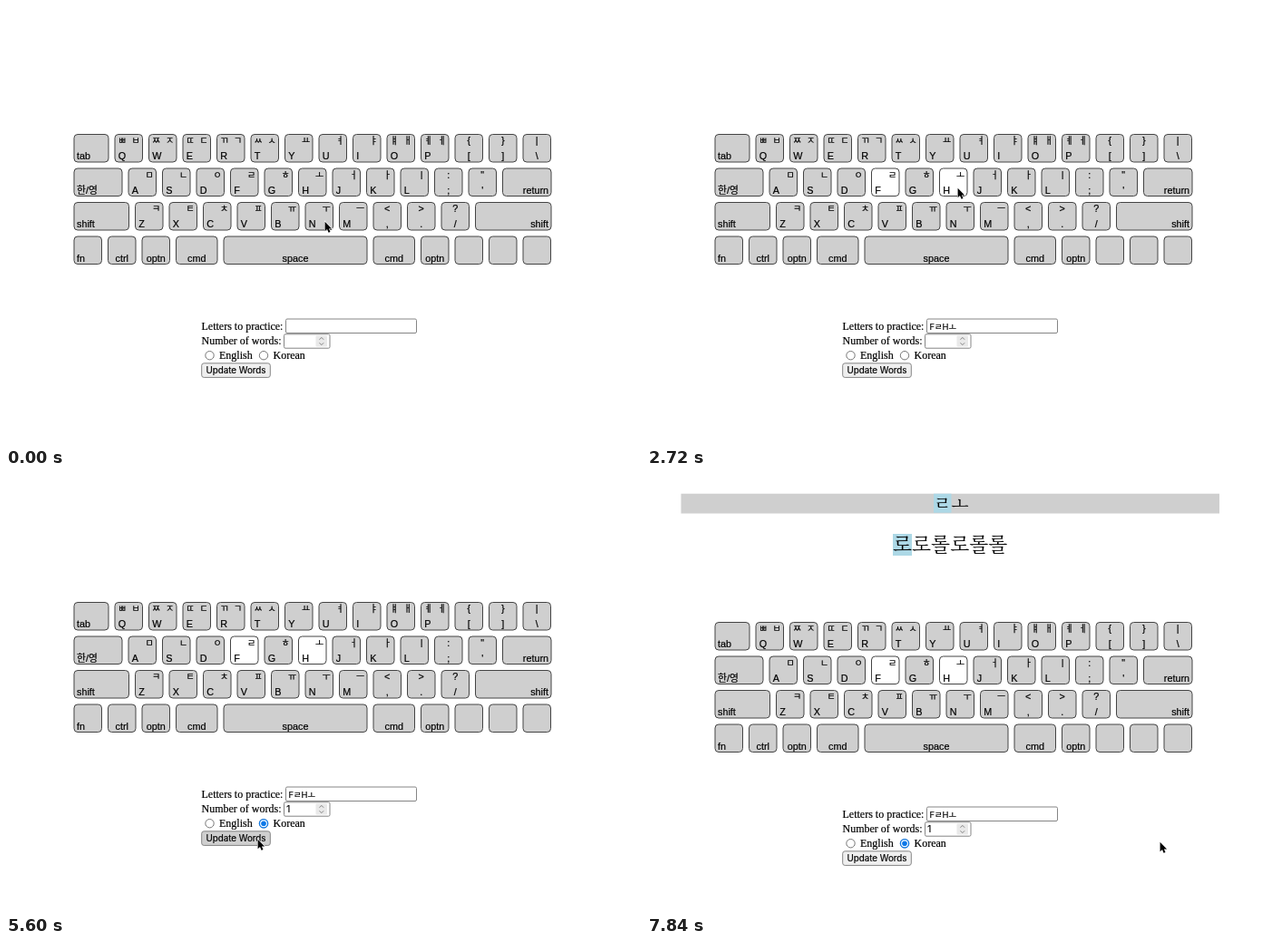
Recreate the animation shown at these times as an HTML page. Size 700 by 485 pixels, loop 8 s.

```html
<!DOCTYPE html>
<html lang="ko">
<head>
<meta charset="utf-8">
<title>Typing practice</title>
<style>
html, body { margin: 0; width: 100%; height: 100%; overflow: hidden; background: #fff; }
svg { display: block; }
#page text { stroke: #000; stroke-width: .2px; }
.label { font: 12px "Liberation Serif", Times, serif; }
.ui { font: 9.8px Inter, "Noto Sans CJK KR", sans-serif; }
.typed1, .typed2 { font-size: 9.3px; }
.key rect { fill: #cfcfcf; stroke: #444; }
.key text { font: 10.8px "Liberation Sans", Arial, "Noto Sans CJK KR", sans-serif; }
.key .jamo { font: 10px "Noto Sans CJK KR", sans-serif; text-anchor: middle; }
.big { font-family: "Noto Serif CJK KR", "Noto Sans CJK KR", serif; }
.field { fill: #fff; stroke: #858585; }
.radio { fill: #fff; stroke: #767676; }

/* every change is a hard step; 2% = 160 ms */
.key-F rect, .key-H rect, .show, #page, #cursor, #spin, #button { animation: 8s step-end infinite; }
.key-F rect { animation-name: lightF; }
.key-H rect { animation-name: lightH; }
.show { opacity: 0; }
.typed1 { animation-name: show20; }
.typed2 { animation-name: show34; }
.one { animation-name: show52; }
.picked { animation-name: show64; }
.words { animation-name: show74; }
#page { animation-name: shift; }
#spin { fill: #e9e9e9; animation-name: hover; }
#button { fill: #efefef; stroke: #858585; animation-name: press; }
#cursor { animation-name: move; }

@keyframes lightF { 0% { fill: #cfcfcf } 20%, 100% { fill: #fff } }
@keyframes lightH { 0% { fill: #cfcfcf } 34%, 100% { fill: #fff } }
@keyframes show20 { 0% { opacity: 0 } 20% { opacity: 1 } 34%, 100% { opacity: 0 } }
@keyframes show34 { 0% { opacity: 0 } 34%, 100% { opacity: 1 } }
@keyframes show52 { 0% { opacity: 0 } 52%, 100% { opacity: 1 } }
@keyframes show64 { 0% { opacity: 0 } 64%, 100% { opacity: 1 } }
@keyframes show74 { 0% { opacity: 0 } 74%, 100% { opacity: 1 } }
@keyframes shift { 0% { transform: translateY(0) } 74%, 100% { transform: translateY(22px) } }
@keyframes hover { 0% { fill: #e9e9e9 } 46% { fill: #cdcdcd } 58%, 100% { fill: #e9e9e9 } }
@keyframes press { 0% { fill: #efefef } 70% { fill: #cfcfcf } 74%, 100% { fill: #efefef } }
@keyframes move {
  0% { transform: translate(351px, 237px) }
  2% { transform: translate(340px, 225px) }
  4% { transform: translate(328px, 208px) }
  6% { transform: translate(322px, 201px) }
  10% { transform: translate(288px, 197px) }
  12% { transform: translate(264px, 196px) }
  26% { transform: translate(272px, 196px) }
  28% { transform: translate(297px, 197px) }
  30% { transform: translate(326px, 197px) }
  32% { transform: translate(341px, 197px) }
  34% { transform: translate(342px, 200px) }
  36% { transform: translate(340px, 260px) }
  38% { transform: translate(335px, 360px) }
  40% { transform: translate(332px, 404px) }
  42% { transform: translate(337px, 392px) }
  44% { transform: translate(344px, 376px) }
  46% { transform: translate(347px, 367px) }
  48% { transform: translate(347px, 368px) }
  56% { transform: translate(349px, 372px) }
  58% { transform: translate(318px, 381px) }
  60% { transform: translate(283px, 387px) }
  66% { transform: translate(281px, 393px) }
  68% { transform: translate(277px, 402px) }
  76% { transform: translate(290px, 402px) }
  78% { transform: translate(345px, 399px) }
  80% { transform: translate(420px, 397px) }
  82% { transform: translate(495px, 400px) }
  84% { transform: translate(545px, 404px) }
  86%, 100% { transform: translate(565px, 405px) }
}
</style>
</head>
<body>
<svg width="700" height="485" viewBox="0 0 700 485">
  <g class="show words big">
    <rect x="37.5" y="21.7" width="593.5" height="21.8" fill="#cfcfcf"/>
    <rect x="316" y="21.7" width="19.5" height="21" fill="#add8e6"/>
    <text x="316" y="39.5" font-size="20">ㄹㅗ</text>
    <rect x="271" y="66" width="21" height="24" fill="#add8e6"/>
    <text x="271" y="85" font-size="21.8">로로롤로롤롤</text>
  </g>

  <g id="page">
    <g id="keys"></g>

    <text class="label" x="215.5" y="356.5">Letters to practice:</text>
    <rect class="field" x="308.5" y="345" width="144" height="15.5" rx="1.5"/>
    <text class="ui show typed1" x="311.5" y="356.5">Fㄹ</text>
    <text class="ui show typed2" x="311.5" y="356.5">FㄹHㅗ</text>

    <text class="label" x="215.5" y="373">Number of words:</text>
    <rect class="field" x="306.5" y="361.8" width="50.5" height="15.4" rx="1.5"/>
    <text class="ui show one" x="309.2" y="373">1</text>
    <rect id="spin" x="341.5" y="363.5" width="12.5" height="12" rx="1"/>
    <path d="M345.5 367.7l2.3-2.3 2.3 2.3M345.5 371.3l2.3 2.3 2.3-2.3" fill="none" stroke="#777" stroke-width=".9"/>

    <circle class="radio" cx="224.5" cy="385.2" r="4.7"/>
    <text class="label" x="235" y="389">English</text>
    <circle class="radio" cx="284" cy="385.2" r="4.7"/>
    <g class="show picked">
      <circle cx="284" cy="385.2" r="4.6" fill="#fff" stroke="#0b78e8" stroke-width="1.3"/>
      <circle cx="284" cy="385.2" r="2.8" fill="#0b78e8"/>
    </g>
    <text class="label" x="294.5" y="389">Korean</text>

    <rect id="button" x="215.7" y="393.8" width="75.6" height="15.6" rx="2.5"/>
    <text class="ui" x="253.5" y="405.3" text-anchor="middle">Update Words</text>
  </g>

  <g id="cursor">
    <path d="M.6 .8V11.2L3 9.1 4.6 12.8 6.5 12 4.9 8.4H8.1Z" stroke="#fff" stroke-width="1.2" paint-order="stroke"/>
  </g>
</svg>
<script>
const PITCH = 37.5, SIZE = 30.5, GAP = 7, LEFT = 75, TOP = 141.5;
const keys = document.getElementById('keys');

function add(parent, tag, attrs, text = '') {
  const el = document.createElementNS('http://www.w3.org/2000/svg', tag);
  for (const name in attrs) el.setAttribute(name, attrs[name]);
  el.textContent = text;
  return parent.appendChild(el);
}

// label: main legend, top: upper legends, width and align for wide keys
function drawKey(x, y, label, top, width = SIZE, align = 'middle') {
  const letter = /^[A-Z]$/.test(label);
  const key = add(keys, 'g', { class: 'key' + (letter ? ' key-' + label : '') });
  add(key, 'rect', { x, y, width, height: SIZE, rx: 4 });
  const anchor = letter ? 'start' : align;
  const tx = { start: x + (letter ? 3.7 : 3), middle: x + width / 2, end: x + width - 3 }[anchor];
  add(key, 'text', { x: tx, y: y + 27.5, 'text-anchor': anchor }, label);
  if (letter) {
    [...top].reverse().forEach((c, i) =>
      add(key, 'text', { class: 'jamo', x: x + 23 - 15 * i, y: y + 10.8 }, c));
  } else if (top) {
    add(key, 'text', { x: tx, y: y + 10.6, 'text-anchor': 'middle' }, top);
  }
  return x + width + GAP;
}

const rows = [
  [['tab', '', 38, 'start'], 'Qㅃㅂ', 'Wㅉㅈ', 'Eㄸㄷ', 'Rㄲㄱ', 'Tㅆㅅ', 'Yㅛ', 'Uㅕ', 'Iㅑ',
    'Oㅒㅐ', 'Pㅖㅔ', '[{', ']}', '\\|'],
  [['한/영', '', 53, 'start'], 'Aㅁ', 'Sㄴ', 'Dㅇ', 'Fㄹ', 'Gㅎ', 'Hㅗ', 'Jㅓ', 'Kㅏ', 'Lㅣ',
    ';:', '\'"', ['return', '', 53.5, 'end']],
  [['shift', '', 60.5, 'start'], 'Zㅋ', 'Xㅌ', 'Cㅊ', 'Vㅍ', 'Bㅠ', 'Nㅜ', 'Mㅡ', ',<', '.>', '/?',
    ['shift', '', 83.5, 'end']],
  [['fn', '', SIZE, 'start'], ['ctrl'], ['optn'], ['cmd', '', 45.5], ['space', '', 158],
    ['cmd', '', 45.5], ['optn'], '', '', '']
];

rows.forEach((row, r) => {
  let x = LEFT;
  for (const k of row) {
    const spec = typeof k === 'string' ? [k.slice(0, 1), k.slice(1)] : k;
    x = drawKey(x, TOP + r * PITCH, ...spec);
  }
});
</script>
</body>
</html>
```
